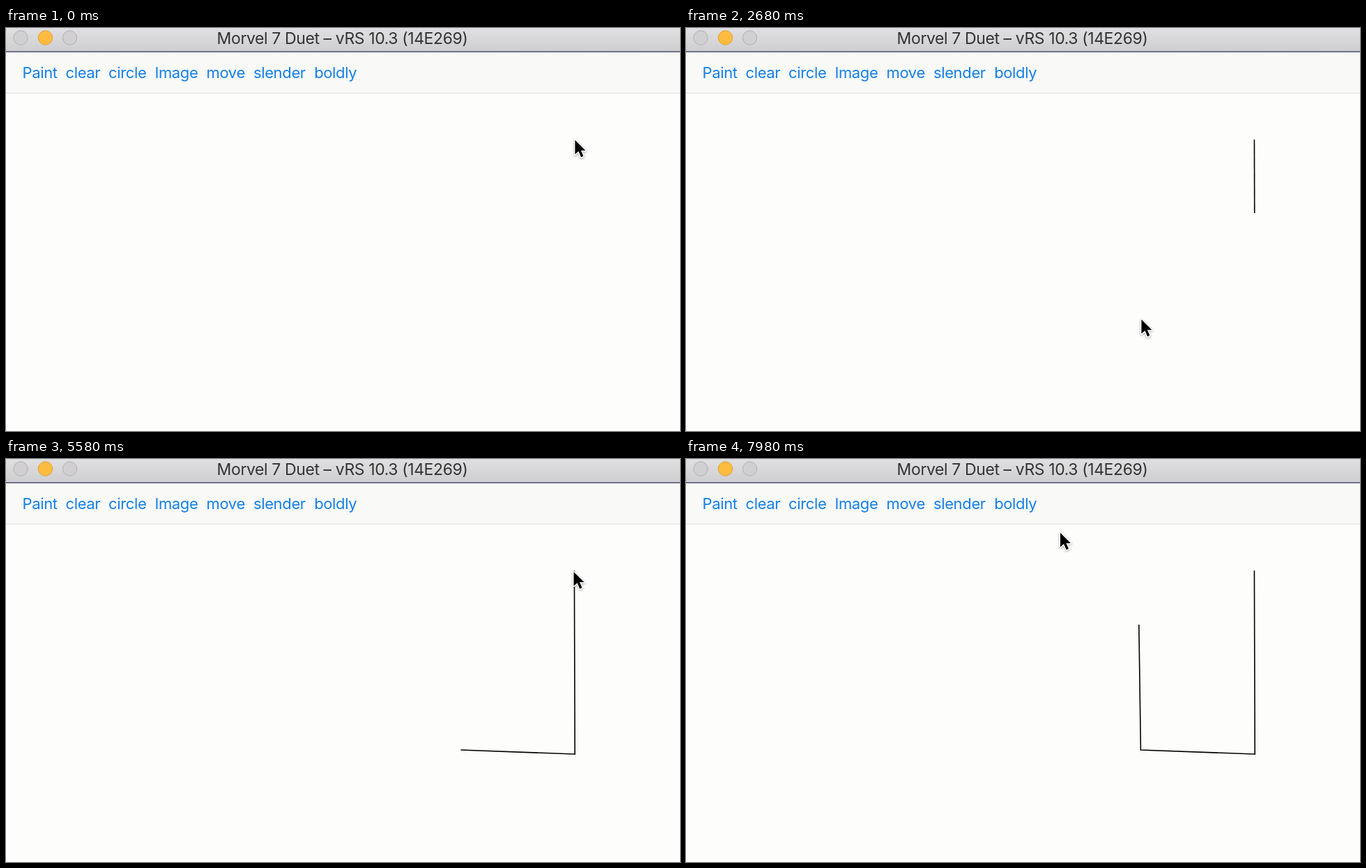
Write an HTML page that moves like this. It is 967 by 579 pixels and loops after 8000 ms.

```html
<!DOCTYPE html>
<html lang="en">
<head>
<meta charset="utf-8">
<title>Line drawing</title>
<style>
  html, body { margin: 0; width: 100%; height: 100%; overflow: hidden; background: #fdfdfc; }
  svg { display: block; }
  text { font-family: Inter, Roboto, sans-serif; }
  .title { font-size: 23px; letter-spacing: -0.4px; fill: #333; text-anchor: middle; }
  .tools { font-size: 22px; letter-spacing: -0.35px; fill: #147fe6; }
  .ink { fill: none; stroke: #000; stroke-width: 1.6; }
  .lamp { fill: #d1cfd1; stroke: #b2b0b2; }
  .lamp.on { fill: #fdbc40; stroke: #dfa033; }
  .arrow { filter: drop-shadow(0 1.5px 1.5px rgba(0, 0, 0, .35)); }
</style>
</head>
<body>
<svg width="967" height="579" viewBox="0 0 967 579">
  <defs>
    <linearGradient id="bar" x2="0" y2="1">
      <stop stop-color="#e0dfe1"/><stop offset="1" stop-color="#cecdd0"/>
    </linearGradient>
  </defs>
  <rect width="967" height="579" fill="#fdfdfc"/>
  <rect y="34" width="967" height="59" fill="#f9f9f8"/>
  <rect y="93" width="967" height="1" fill="#dededa"/>
  <rect width="967" height="34" fill="url(#bar)"/>
  <rect y="33.4" width="967" height="1.4" fill="#42446c"/>
  <circle class="lamp" cx="21" cy="14" r="10.2"/>
  <circle class="lamp on" cx="56.5" cy="14" r="10.2"/>
  <circle class="lamp" cx="91.5" cy="14" r="10.2"/>
  <text class="title" x="482.5" y="23">Morvel 7 Duet – vRS 10.3 (14E269)</text>
  <text class="tools" y="71.5"><tspan x="23.5">Paint</tspan></text>
  <path class="ink" id="line"/>
  <circle id="touch" r="38.3" fill="none" stroke="#000" stroke-width="2.6"/>
  <g id="cursor" class="arrow">
    <path d="M1 2V22.5L6 18L9.7 26.5L13 25L9.5 17H16Z" stroke="#fff" stroke-width="3"
          stroke-linejoin="round" paint-order="stroke"/>
  </g>
</svg>
<script>
const LOOP = 8000;
const $ = id => document.getElementById(id);

// Menu words follow each other with a fixed gap.
const tools = document.querySelector('.tools');
for (const word of ['clear', 'circle', 'Image', 'move', 'slender', 'boldly']) {
  const span = tools.appendChild(tools.firstChild.cloneNode());
  span.removeAttribute('x');
  span.setAttribute('dx', 12);
  span.textContent = word;
}

const start = { x: 815.4, y: 160.3 };

// The pointer glides to each corner and presses; the side to it is inked later.
const corners = [
  { x: 816.2, y: 424, leave: 120, arrive: 680, ink: 1140, dry: 3920 },
  { x: 652.4, y: 418, leave: 1640, arrive: 2260, ink: 3960, dry: 5460 },
  { x: 649.8, y: 238, leave: 2800, arrive: 3720, ink: 5600, dry: 7100 }
];
const glides = [
  ...corners,
  { ...start, leave: 4700, arrive: 5640 },
  { x: 536, y: 105.2, leave: 7000, arrive: 7980 }
];

const progress = (t, from, to) => Math.min(1, Math.max(0, (t - from) / (to - from)));
const smooth = p => p * p * (3 - 2 * p);
const easeIn = p => p ** 1.55;
const mix = (a, b, p) => ({ x: a.x + (b.x - a.x) * p, y: a.y + (b.y - a.y) * p });

function draw(t) {
  const pointer = glides.reduce(
    (at, glide) => mix(at, glide, smooth(progress(t, glide.leave, glide.arrive))), start);
  $('cursor').setAttribute('transform', `translate(${pointer.x} ${pointer.y - 1.2})`);

  let path = `M${start.x} ${start.y}`, last = start;
  for (const corner of corners) {
    const end = mix(last, corner, easeIn(progress(t, corner.ink, corner.dry)));
    if (t > corner.ink) path += `L${end.x} ${end.y}`;
    last = corner;
  }
  $('line').setAttribute('d', path);

  const pressed = corners.find(({ arrive }) => t >= arrive + 60 && t < arrive + 320);
  $('touch').style.display = pressed ? '' : 'none';
  if (pressed) $('touch').setAttribute('transform', `translate(${pressed.x} ${pressed.y})`);
}

const begin = performance.now();
function tick() {
  draw((performance.now() - begin) % LOOP);
  requestAnimationFrame(tick);
}
tick();
</script>
</body>
</html>
```
